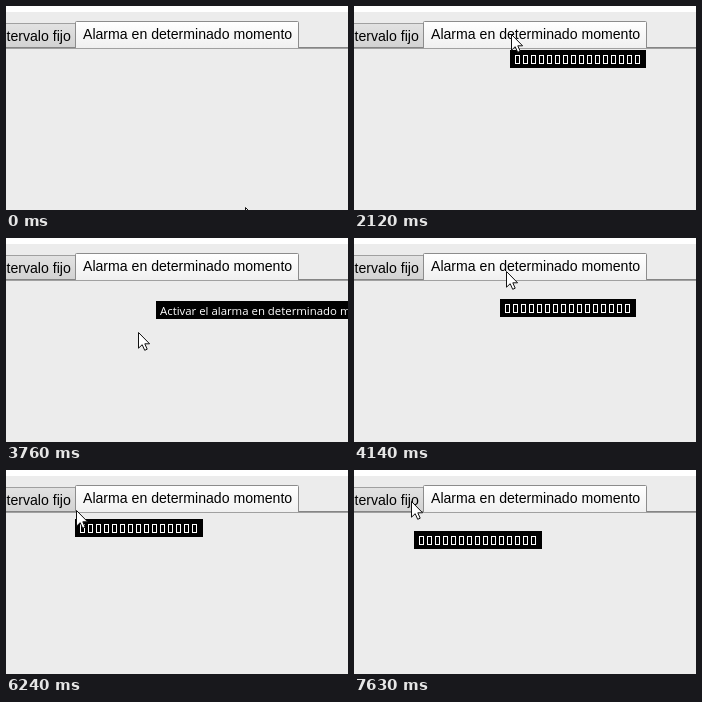
Animation of 342 by 204 pixels, one loop 8000 ms. Source, as an HTML page:

```html
<!DOCTYPE html>
<html lang="es">
<head>
<meta charset="utf-8">
<style>
html, body { margin: 0; width: 100%; height: 100%; overflow: hidden; }
svg { display: block; }
.tab { font: 14.1px "Liberation Sans", Arial, sans-serif; }
.tip { font: 11.4px "Open Sans", sans-serif; fill: #fff; }
</style>
</head>
<body>
<svg width="342" height="204" viewBox="0 0 342 204">
  <defs>
    <linearGradient id="active" x2="0" y2="1">
      <stop offset="0" stop-color="#fff"/>
      <stop offset="1" stop-color="#f0f0f0"/>
    </linearGradient>
    <linearGradient id="idle" x2="0" y2="1">
      <stop offset="0" stop-color="#e2e2e2"/>
      <stop offset="1" stop-color="#d2d2d2"/>
    </linearGradient>
    <pattern id="glyphs" x="4" width="8" height="18" patternUnits="userSpaceOnUse">
      <rect x="1.5" y="5.5" width="4" height="8" fill="none" stroke="#fff"/>
    </pattern>
  </defs>
  <rect width="342" height="204" fill="#fff"/>
  <rect y="6" width="342" height="198" fill="#ececec"/>
  <rect x="-5" y="17.5" width="75" height="24" fill="url(#idle)" stroke="#a0a0a0"/>
  <path d="M0 41.5H342" stroke="#858585"/>
  <path d="M69.5 42V16.5Q69.5 15.5 70.5 15.5H291.5Q292.5 15.5 292.5 16.5V42" fill="url(#active)" stroke="#8c8c8c"/>
  <path d="M0 42.5H342" stroke="#a0a0a0"/>
  <text class="tab" x=".5" y="35">tervalo fijo</text>
  <text class="tab" x="77" y="33">Alarma en determinado momento</text>
  <g id="tip">
    <rect id="box" height="18"/>
    <rect id="boxes" x="4" height="18" fill="url(#glyphs)"/>
    <text id="label" class="tip" x="4" y="14">Activar el alarma en determinado momento del día</text>
  </g>
  <path id="cursor" d="M.5 .5V16.2L4.2 12.7L6.7 18.3L9.2 17.2L6.8 11.8H11.6Z" fill="#fff" stroke="#111"/>
</svg>
<script>
const LOOP = 8000, STEP = 76, SENTENCE = 0;
const $ = id => document.getElementById(id);

const poses = [{ time: 0, x: 239, y: 201 }];
let clock = 0;

const at = time => { clock = time; };

// Move the pointer in even time steps; power bends the pace
function move(count, x, y, power = 1) {
  const from = poses.at(-1);
  for (let i = 1; i <= count; i++, clock += STEP) {
    const p = (i / count) ** power;
    poses.push({
      ...from,
      time: clock,
      x: Math.round(from.x + (x - from.x) * p),
      y: Math.round(from.y + (y - from.y) * p)
    });
  }
}

// Open a tooltip under the latest pose: a row of glyph boxes or the sentence
function open(count) {
  const pose = poses.at(-1);
  pose.tip = { x: pose.x - 2, y: pose.y + 18, count };
}

at(70);   move(1, 222, 172);
at(105);  move(3, 161, 70);
at(410);  move(5, 158, 26);
at(1420); move(1, 158, 26); open(16);
at(2120); move(3, 152, 45, 2); open(SENTENCE); move(2, 132, 95);
at(3760); move(4, 148, 43, 3); open(16); move(2, 152, 33);
at(4690); move(4, 123, 31, 2); move(3, 99, 33);
at(5300); move(2, 71, 31); open(15);
at(6240); move(2, 70, 45, .6); open(SENTENCE); move(2, 71, 54);
at(7320); move(3, 62, 43, 1.5); open(15); move(2, 57, 31);

const place = (el, { x, y }) => el.setAttribute("transform", `translate(${x} ${y})`);
const show = (el, on) => { el.style.display = on ? "" : "none"; };

function draw(time) {
  const pose = poses.findLast(p => p.time <= time);
  const { tip } = pose;
  place($("cursor"), pose);
  show($("tip"), tip);
  if (!tip) return;
  place($("tip"), tip);
  $("box").setAttribute("width", tip.count ? tip.count * 8 + 8 : 300);
  $("boxes").setAttribute("width", tip.count * 8);
  show($("label"), tip.count === SENTENCE);
}

const start = performance.now();
function tick() {
  draw((performance.now() - start) % LOOP);
  requestAnimationFrame(tick);
}
tick();
</script>
</body>
</html>
```
